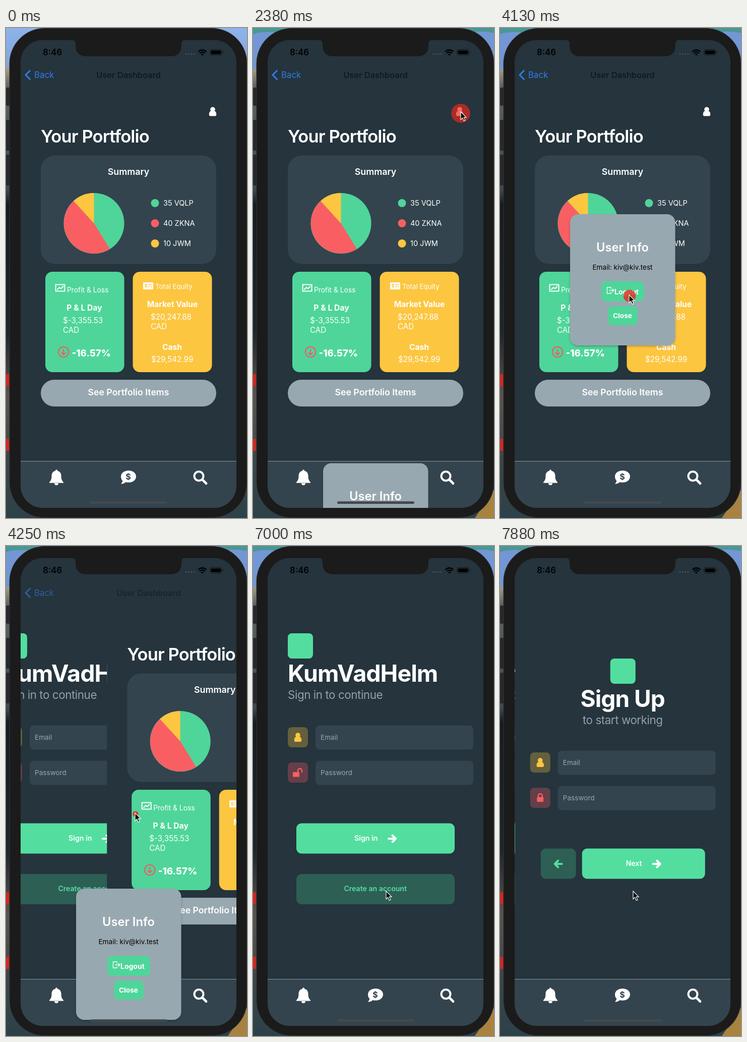
Write an HTML page that moves like this. It is 478 px wide and 971 px high and loops after 8000 ms.

```html
<!DOCTYPE html>
<html lang="en">
<head>
<meta charset="utf-8">
<title>Portfolio app</title>
<style>
html, body { margin: 0; width: 100%; height: 100%; overflow: hidden; background: #1a1a1a; }
svg { display: block; width: 478px; height: 971px; font-family: Inter, Roboto, sans-serif; }
.mid { text-anchor: middle; }
.semi { font-weight: 600; }
.bold { font-weight: 700; }
.tight { letter-spacing: -.02em; }
.sub { fill: #93a1a9; font-size: 22.4px; }
.line { fill: none; stroke-linecap: round; stroke-linejoin: round; }
.page { fill: #25343d; }
.panel { fill: #33444e; }
.green { fill: #4fd59a; }
.mint { fill: #53dea0; }
.moss { fill: #2d5f55; }
.red { fill: #f95f62; }
.yellow { fill: #fcc640; }
.white { fill: #fff; }
</style>
</head>
<body>
<svg viewBox="0 0 478 971">
<defs>
  <linearGradient id="wall" x2="0" y2="1">
    <stop offset="0" stop-color="#8db3ea"/>
    <stop offset=".08" stop-color="#84a5d8"/>
    <stop offset=".085" stop-color="#a39a80"/>
    <stop offset=".12" stop-color="#5d625f"/>
    <stop offset=".33" stop-color="#3d4a50"/>
    <stop offset=".36" stop-color="#161b20"/>
    <stop offset=".62" stop-color="#1c262b"/>
    <stop offset=".75" stop-color="#5a5350"/>
    <stop offset=".88" stop-color="#3b4648"/>
    <stop offset="1" stop-color="#2c4148"/>
  </linearGradient>
  <clipPath id="screen"><rect x="29" y="24" width="428" height="927" rx="44"/></clipPath>
  <filter id="shadow" x="-10%" y="-10%" width="120%" height="120%">
    <feDropShadow dx="0" dy="2" stdDeviation="2" flood-opacity=".25"/>
  </filter>
  <path id="person" d="M0-9.500a4.700 4.700 0 0 1 3.600 7.900C6 -1 7.300 1.500 7.300 5.500Q7.300 8.500 4.500 8.500H-4.500Q-7.300 8.500-7.300 5.500C-7.300 1.500-6-1-3.600-1.600A4.700 4.700 0 0 1 0-9.500Z"/>
  <path id="arrow" class="line" d="M-7 0H7M0.500-6.500L7 0L0.500 6.500" stroke-width="4"/>
  <g id="fields">
    <rect x="69" y="359" width="40" height="40" rx="8" fill="#645f3c"/>
    <use href="#person" x="89" y="379.500" class="yellow"/>
    <rect x="69" y="429" width="40" height="40" rx="8" fill="#653f48"/>
    <rect class="panel" x="124" y="355.500" width="313" height="48" rx="8"/>
    <rect class="panel" x="124" y="425.500" width="313" height="48" rx="8"/>
    <g fill="#9aa6ad" font-size="13.600">
      <text x="134" y="384">Email</text>
      <text x="134" y="454">Password</text>
    </g>
  </g>
</defs>

<rect width="478" height="971" fill="url(#wall)"/>
<path fill="#d3261f" d="M0 686H6V710H0ZM0 814H6V838H0Z"/>
<g id="shifted">
  <rect width="478" height="82" fill="#7297d4"/>
  <path fill="#4a9794" d="M0 0H60V12Q25 4 0 12ZM420 0H478V10Q450 4 420 10Z"/>
  <path fill="#a8823f" d="M440 971L478 915V971Z"/>
</g>

<rect x="0" y="118" width="9" height="36" rx="2" fill="#26292b"/>
<rect x="0" y="182" width="9" height="61" rx="2" fill="#26292b"/>
<rect x="0" y="251" width="9" height="61" rx="2" fill="#26292b"/>
<rect x="7" y="0.500" width="471" height="970" rx="70" fill="#1b1b1b" stroke="#343637"/>

<g clip-path="url(#screen)">
  <rect class="page" x="29" y="24" width="428" height="927"/>

  <g id="login">
    <rect class="page" x="29" y="24" width="428" height="834"/>
    <rect class="mint" x="69" y="173" width="50" height="50" rx="8"/>
    <text class="white bold tight" x="69" y="269" font-size="46.500">KumVadHelm</text>
    <text class="sub tight" x="69" y="303">Sign in to continue</text>
    <use href="#fields"/>
    <rect class="red" x="79" y="448" width="13" height="9.500" rx="1.500"/>
    <path class="line" d="M89 448V445a4 4 0 0 1 8 0V448" stroke="#f95f62" stroke-width="2.300"/>
    <rect class="mint" x="86" y="549.500" width="314" height="60" rx="10"/>
    <text class="white semi" x="201" y="584" font-size="14.200">Sign in</text>
    <use href="#arrow" x="276" y="580" stroke="#fff"/>
    <rect class="moss" x="86" y="650" width="314" height="60" rx="10"/>
    <text class="mint semi mid" x="242.700" y="684" font-size="14.100">Create an account</text>
  </g>

  <g id="dash">
    <rect class="page" x="29" y="24" width="428" height="834"/>
    <use href="#person" x="410" y="166" class="white"/>
    <text class="white semi" x="69" y="226.500" font-size="34.500" letter-spacing="-.025em">Your Portfolio</text>
    <rect class="panel" x="69" y="252.500" width="348" height="215" rx="28"/>
    <text class="white semi mid" x="243" y="291" font-size="17.800">Summary</text>
    <circle class="green" cx="174.500" cy="387" r="60"/>
    <path class="red" d="M174.500 387L206.100 438A60 60 0 0 1 134.100 342.700Z"/>
    <path class="yellow" d="M174.500 387L134.100 342.700A60 60 0 0 1 174.500 327Z"/>
    <circle class="green" cx="295.500" cy="347" r="8"/>
    <circle class="red" cx="295.500" cy="387" r="8"/>
    <circle class="yellow" cx="295.500" cy="427" r="8"/>
    <g class="white" font-size="14.500">
      <text x="312" y="351.500">35 VQLP</text>
      <text x="312" y="391.500">40 ZKNA</text>
      <text x="312" y="431.500">10 JWM</text>
    </g>

    <rect class="green" x="78" y="483" width="156.500" height="199" rx="14"/>
    <g class="line" stroke="#fff" stroke-width="2">
      <rect x="98.500" y="508.500" width="18" height="13"/>
      <path d="M102 518L106 514L109 516.500L113.500 512"/>
    </g>
    <g class="line" stroke="#f05a62" stroke-width="2">
      <circle cx="114" cy="642" r="10.200"/>
      <path d="M114 637V647M110 643.500L114 647.500L118 643.500"/>
    </g>
    <rect class="yellow" x="251.500" y="483" width="157" height="199" rx="14"/>
    <rect class="white" x="272" y="504" width="20" height="14" rx="1.500"/>
    <path class="line" d="M282 509H289M282 513H284M287 513H289" stroke="#fcc640" stroke-width="1.500"/>
    <text class="yellow bold mid" x="277.500" y="514" font-size="9">$</text>
    <g class="white" font-size="15.200">
      <text x="121" y="524" font-size="13.800">Profit &amp; Loss</text>
      <text class="bold mid" x="155.500" y="560" font-size="15.700">P &amp; L Day</text>
      <text x="113" y="585">$-3,355.53</text>
      <text x="113" y="604">CAD</text>
      <text x="130.500" y="651" font-size="18.700" font-weight="800">-16.57%</text>
      <text x="296" y="517" font-size="13.300">Total Equity</text>
      <text class="bold mid" x="330" y="553" font-size="15.600">Market Value</text>
      <text x="287" y="578">$20,247.88</text>
      <text x="287" y="597">CAD</text>
      <text class="bold mid" x="329.500" y="638" font-size="15.600">Cash</text>
      <text x="288" y="662">$29,542.99</text>
    </g>
    <rect x="69" y="697" width="348" height="53" rx="26.500" fill="#98a8b0"/>
    <text class="white semi mid" x="243" y="727.500" font-size="17.700">See Portfolio Items</text>
  </g>

  <g id="signup">
    <rect class="page" x="29" y="24" width="428" height="834"/>
    <rect class="mint" x="218" y="223" width="50" height="50" rx="8"/>
    <text class="white bold tight mid" x="242.500" y="319" font-size="46">Sign Up</text>
    <text class="sub tight mid" x="242.500" y="353">to start working</text>
    <use href="#fields" x="-10" y="50"/>
    <rect class="red" x="72.500" y="497.500" width="13" height="9.500" rx="1.500"/>
    <path class="line" d="M75 498V495a4 4 0 0 1 8 0V498" stroke="#f95f62" stroke-width="2.300"/>
    <rect class="moss" x="80" y="599.500" width="70" height="60" rx="10"/>
    <use href="#arrow" transform="translate(115 630) scale(-1 1)" stroke="#53dea0"/>
    <rect class="mint" x="162" y="599.500" width="244" height="60" rx="10"/>
    <text class="white semi" x="249" y="634" font-size="14">Next</text>
    <use href="#arrow" x="310" y="630" stroke="#fff"/>
  </g>

  <g id="header">
    <path class="line" d="M47.500 84.500L39 93L47.500 101.500" stroke="#2f7de6" stroke-width="3"/>
    <text x="56" y="99" fill="#2f7de6" font-size="16.800">Back</text>
    <text id="title" class="mid" x="243" y="99" fill="#10171b" font-size="16.500" font-weight="500">User Dashboard</text>
  </g>

  <rect class="panel" x="29" y="858" width="428" height="93"/>
  <path d="M29 858.500H457" stroke="#8b989f"/>
  <path class="white" d="M100 875q2 0 2 2.500c5 1 7.500 5 7.500 10 0 6 1 9 4.500 12.500v1.500H86V900c3.500-3.500 4.500-6.500 4.500-12.500 0-5 2.500-9 7.500-10q0-2.500 2-2.500ZM96 902H104a4 4 0 0 1-8 0Z"/>
  <path class="white" d="M243 877c8.500 0 15 5 15 11.800s-6.500 11.800-15 11.800q-3 0-5.500-.7-4 3.600-9.500 3.600 3-3 3.300-6.300c-2.200-2.200-3.300-5-3.300-8.400 0-6.800 6.500-11.800 15-11.800Z"/>
  <text class="panel bold mid" x="242.500" y="895" font-size="16">$</text>
  <g class="line" stroke="#fff" stroke-width="4">
    <circle cx="382.500" cy="888" r="9"/>
    <path d="M389.500 895L397 902.500" stroke-width="4.800"/>
  </g>

  <g id="modal">
    <rect x="139" y="369" width="208.500" height="260" rx="16" fill="#98a8b0" filter="url(#shadow)"/>
    <text class="white semi mid" x="243" y="442.500" font-size="23.700">User Info</text>
    <text class="mid" x="243" y="478.500" font-size="13.600">Email: kiv@kiv.test</text>
    <rect class="green" x="201" y="502" width="85" height="40" rx="9"/>
    <path class="line" d="M220 516V514H212.500V526H220V524M217 520H226M223 517L226 520L223 523" stroke="#fff" stroke-width="1.300"/>
    <text class="white bold" x="227" y="528" font-size="14">Logout</text>
    <rect class="green" x="214" y="551" width="59" height="38" rx="9"/>
    <text class="white bold mid" x="243" y="575" font-size="13.700">Close</text>
  </g>
  <rect x="167" y="938" width="153" height="5" rx="2.500" fill="#43494c"/>
</g>

<path fill="#1b1b1b" d="M131 23V24q7 0 7 7V34q0 22 22 22H326q22 0 22-22V31q0-7 7-7V23Z"/>
<text class="semi" x="73" y="54" font-size="16.800">8:46</text>
<path class="line" d="M357 51.500H375" stroke="#46525a" stroke-width="3" stroke-dasharray="0 5.300"/>
<g class="line" stroke="#000" stroke-width="2.400" stroke-linecap="butt">
  <path d="M382.200 46.500A10.500 10.500 0 0 1 396.800 46.500M385 49.500A6.500 6.500 0 0 1 394 49.500"/>
</g>
<path d="M389.500 55L386.800 52A4 4 0 0 1 392.200 52Z"/>
<rect x="404.500" y="42.500" width="24" height="11.500" rx="3.500" fill="none" stroke="#11181c"/>
<rect x="406.500" y="44.500" width="20" height="7.500" rx="2"/>
<path d="M430 46.500q2 1.700 0 3.500Z"/>

<circle id="tap" fill="#e8281c"/>
<path id="pointer" d="M0 0V15.500L3.600 12.200L6.200 18.300L8.900 17.100L6.300 11.200H11Z" stroke="#fff" stroke-width="1.200"/>
</svg>

<script>
const LOOP = 8000, STEP = 125, WIDTH = 428, HEIGHT = 926;
const el = id => document.getElementById(id);
const move = (id, x, y = 0) => el(id).setAttribute("transform", `translate(${x} ${y})`);
const show = (id, on) => el(id).style.display = on ? "" : "none";

// Critically damped spring, falling from 1 to 0; t in ms
const spring = (t, w) => t <= 0 ? 1 : (1 + w * t / 1000) * Math.exp(-w * t / 1000);

// time, x, y
const path = [
  [750, 224, 212], [1125, 365, 217], [1375, 365, 217], [1750, 415, 162],
  [2125, 412, 166], [3125, 412, 166], [3625, 256, 529], [4250, 256, 529],
  [5000, 237.500, 530], [5625, 237.500, 530], [5750, 239.500, 530],
  [6375, 239.500, 530], [7000, 264, 684], [LOOP, 264, 684]
];
const taps = [[1375, 368, 217], [2250, 412, 169], [3875, 257, 531], [7250, 266, 685]];

function pointerAt(t) {
  const i = Math.max(1, path.findIndex(k => k[0] > t));
  const [a, b] = [path[i - 1], path[i]];
  const u = Math.max(0, (t - a[0]) / (b[0] - a[0]));
  const e = u * u * (3 - 2 * u);
  return [a[1] + (b[1] - a[1]) * e, a[2] + (b[2] - a[2]) * e];
}

function draw(now) {
  let t = Math.floor(now % LOOP / STEP) * STEP;
  const stalled = t >= 4250 && t < 5000;
  if (stalled) t = 4250;

  const out = t < 4250 ? 0 : stalled ? .4 : 1;
  const next = 1 - spring(t - 7300, 15);
  show("shifted", t >= 1375);
  move("dash", WIDTH * out);
  move("login", -.3 * WIDTH * (1 - out + next));
  move("signup", WIDTH * (1 - next));
  move("modal", 0, t < 4250 ? HEIGHT * spring(t - 2300, 21) : stalled ? 310 : HEIGHT);
  el("header").style.opacity = 1 - out;
  move("title", 100 * out);

  show("pointer", t >= 750);
  move("pointer", ...pointerAt(t));

  const tap = taps.findLast(k => k[0] <= t);
  const r = tap ? 25.500 - .053 * (t - tap[0]) : 0;
  show("tap", r > 0);
  if (r > 0) {
    move("tap", tap[1], tap[2]);
    el("tap").setAttribute("r", r);
    el("tap").style.opacity = 1 - r / 60;
  }
}

const start = performance.now();
function tick() {
  draw(performance.now() - start);
  requestAnimationFrame(tick);
}
tick();
</script>
</body>
</html>
```
